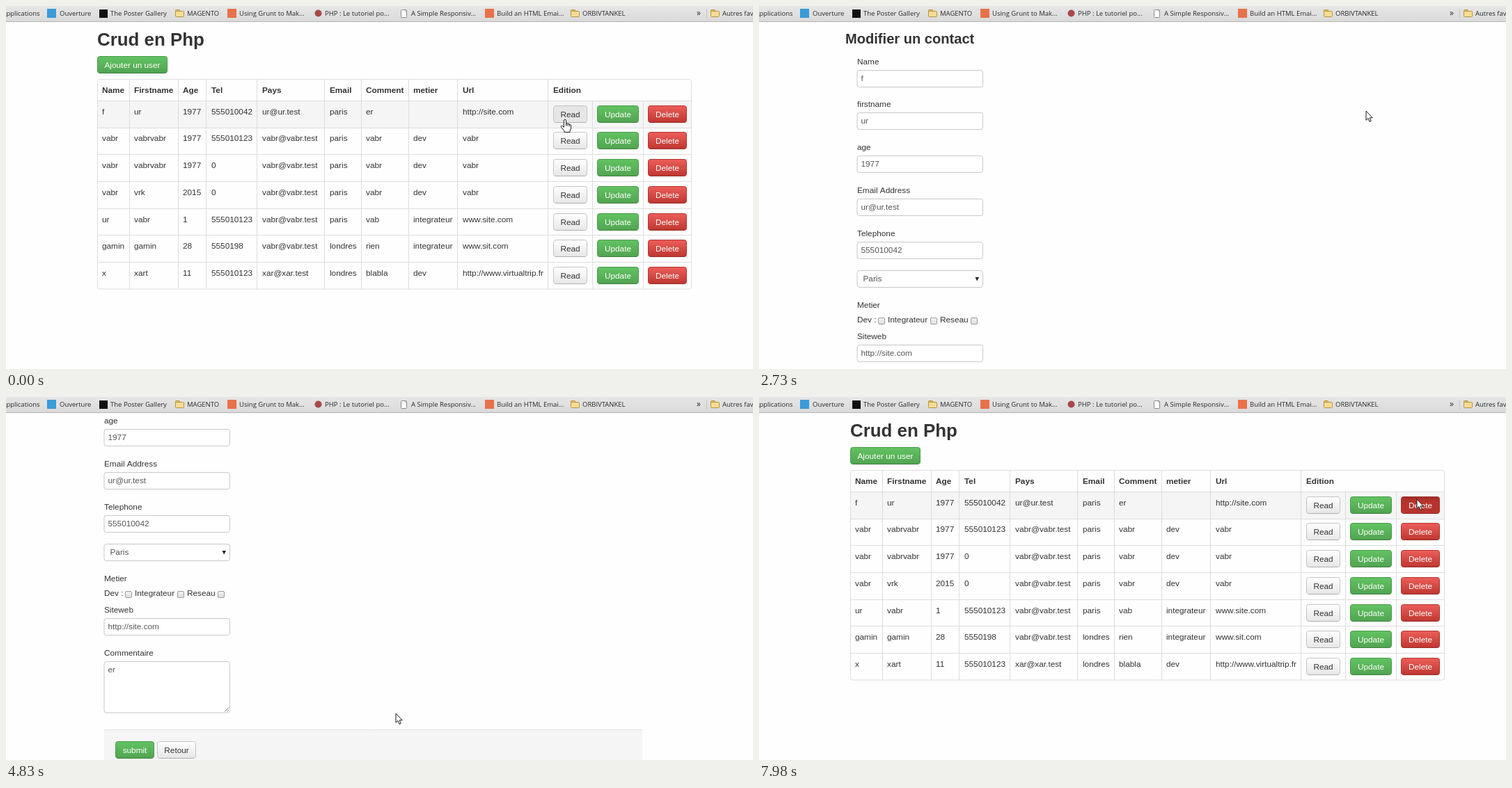
Write an HTML page with a canvas that moves like this. It is 1073x522 px and loops after 8 s.

```html
<!DOCTYPE html>
<html lang="fr">
<head>
<meta charset="utf-8">
<title>Crud en Php</title>
<style>
html, body { margin: 0; width: 100%; height: 100%; overflow: hidden; background: #fefefe; }
canvas { display: block; }
</style>
</head>
<body>
<canvas id="stage" width="1073" height="522"></canvas>
<script>
const ctx = document.getElementById('stage').getContext('2d');
const W = 1073, H = 522, LOOP = 8000, STEP = 70;
const SANS = '"Liberation Sans", Arial, sans-serif';
const BODY = `11.8px ${SANS}`, BOLD = `bold 11.8px ${SANS}`;
const TITLE = `bold 25.9px ${SANS}`, SUBTITLE = `bold 20.1px ${SANS}`;
const BAR = '9.5px "Open Sans", "Noto Sans", sans-serif';

const PHONE = '555010042', MAIL = 'ur@ur.test', MAIL2 = 'vabr@vabr.test';
const HEADS = ['Name', 'Firstname', 'Age', 'Tel', 'Pays', 'Email', 'Comment', 'metier', 'Url', 'Edition'];
const COLS = [138, 184, 254, 295, 368, 465, 517, 585, 656, 786];
const LINES = [177.5, 247.5, 287.5, 360.5, 457.5, 510.5, 578.5, 648.5, 778.5, 842.5, 915.5];
const ROWS = [
  ['f', 'ur', '1977', PHONE, MAIL, 'paris', 'er', '', 'http://site.com'],
  ['vabr', 'vabrvabr', '1977', '555010123', MAIL2, 'paris', 'vabr', 'dev', 'vabr'],
  ['vabr', 'vabrvabr', '1977', '0', MAIL2, 'paris', 'vabr', 'dev', 'vabr'],
  ['vabr', 'vrk', '2015', '0', MAIL2, 'paris', 'vabr', 'dev', 'vabr'],
  ['ur', 'vabr', '1', '555010123', MAIL2, 'paris', 'vab', 'integrateur', 'www.site.com'],
  ['gamin', 'gamin', '28', '5550198', MAIL2, 'londres', 'rien', 'integrateur', 'www.sit.com'],
  ['x', 'xart', '11', '555010123', 'xar@xar.test', 'londres', 'blabla', 'dev', 'http://www.virtualtrip.fr']
];
const rowTop = i => 136.5 + i * 38.68;

// Button skins: gradient top, bottom, border, text
const SKINS = {
  plain: ['#ffffff', '#e6e6e6', '#c4c4c4', '#333'],
  green: ['#62c462', '#51a351', '#4a9a4a', '#fff'],
  red: ['#ee5f5b', '#bd362f', '#b5352f', '#fff']
};

// Pointer path: time, x, y
const PATH = [
  [0, 803, 163], [490, 803, 163], [560, 640, 265], [630, 428, 375], [770, 428, 375],
  [840, 427, 388], [1260, 402, 428], [1470, 402, 428], [1890, 885, 110], [1960, 885, 110],
  [2100, 880, 125], [2170, 870, 150], [2310, 872, 151], [4690, 872, 151], [4760, 803, 427],
  [4830, 560, 455], [4900, 338, 478], [4970, 338, 478], [5530, 192, 506], [5600, 192, 506],
  [5740, 221, 503], [5950, 224, 504], [6160, 224, 504], [6510, 945, 500], [6580, 945, 500],
  [6860, 950, 388], [7000, 950, 388], [7490, 948, 188], [7560, 948, 188], [7770, 945, 147],
  [8000, 945, 147]
];
const PRESSES = [[70, 140], [1400, 1470], [2450, 2730], [6090, 6160], [7910, 8000]];
const SCENES = [[0, drawList], [140, drawDetail], [1470, drawList], [2730, drawForm], [6160, drawList]];

let now, hover, pressed, overButton, pointer;

function pointerAt(t) {
  const i = Math.max(1, PATH.findIndex(p => p[0] >= t));
  const [t0, x0, y0] = PATH[i - 1], [t1, x1, y1] = PATH[i];
  const k = (t - t0) / (t1 - t0);
  return { x: x0 + (x1 - x0) * k, y: y0 + (y1 - y0) * k };
}
const pointerShown = t => t < 2870 || t >= 4760;
const inside = (p, x, y, w, h) => p.x >= x && p.x <= x + w && p.y >= y && p.y <= y + h;

function scrollAt(t) {
  if (t < 3640) return 0;
  const u = Math.min(1, (t - 3640) / 560);
  return 46 + 123 * (1 - Math.pow(1 - u, 1.62));
}

function text(s, x, mid, font = BODY, color = '#333', align = 'left') {
  ctx.font = font;
  ctx.fillStyle = color;
  ctx.textAlign = align;
  ctx.fillText(s, x, mid + 4);
}

function rect(x, y, w, h, color) {
  ctx.fillStyle = color;
  ctx.fillRect(x, y, w, h);
}

function box(x, y, w, h, r, fill, stroke) {
  ctx.beginPath();
  ctx.roundRect(x, y, w, h, r);
  if (fill) { ctx.fillStyle = fill; ctx.fill(); }
  if (stroke) { ctx.strokeStyle = stroke; ctx.lineWidth = 1; ctx.stroke(); }
}

function line(x0, y0, x1, y1, color) {
  ctx.beginPath();
  ctx.moveTo(x0, y0);
  ctx.lineTo(x1, y1);
  ctx.strokeStyle = color;
  ctx.lineWidth = 1;
  ctx.stroke();
}

function shade(y0, y1, ...colors) {
  const g = ctx.createLinearGradient(0, y0, 0, y1);
  colors.forEach((c, i) => g.addColorStop(i / (colors.length - 1), c));
  return g;
}

function button(label, x, y, w, skin) {
  const [top, bottom, edge, ink] = SKINS[skin], h = 25;
  const hot = hover && inside(hover, x, y, w, h);
  if (pointerShown(now) && inside(pointer, x, y, w, h)) overButton = true;
  box(x + .5, y + .5, w - 1, h - 1, 3.3, hot ? bottom : shade(y, y + h, top, bottom), edge);
  if (hot && pressed) box(x + .5, y + .5, w - 1, h - 1, 3.3, shade(y, y + 6, 'rgba(0,0,0,.2)', 'rgba(0,0,0,.04)'));
  line(x + 3, y + h - .5, x + w - 3, y + h - .5, skin === 'plain' ? '#b0b0b0' : 'rgba(0,0,0,.16)');
  text(label, x + w / 2, y + 12.7, BODY, ink, 'center');
}

function drawList() {
  text('Crud en Php', 131, 52.5, TITLE);
  button('Ajouter un user', 131, 72, 101, 'green');
  ROWS.forEach((row, i) => {
    const y = rowTop(i);
    if (hover && inside(hover, 131, y, 854, 38.6)) rect(131.5, y, 853, 38.7, '#f5f5f5');
  });
  box(131.5, 105.5, 853, 301.5, 3.3, null, '#ddd');
  LINES.forEach((x, i) => line(x, i < 9 ? 106 : 136, x, 407, '#ddd'));
  HEADS.forEach((s, i) => text(s, COLS[i], 121.3, BOLD));
  ROWS.forEach((row, i) => {
    const y = rowTop(i), edge = Math.round(y - .5) + .5, top = Math.round(y + 6.3);
    line(131.5, edge, 984.5, edge, '#ddd');
    row.forEach((s, c) => text(s, COLS[c], y + 15.3));
    button('Read', 786, top, 49, 'plain');
    button('Update', 849, top, 60, 'green');
    button('Delete', 922, top, 56, 'red');
  });
}

function actionBar(x, y, w) {
  rect(x, y, w, 58, '#f5f5f5');
  line(x, y + .5, x + w, y + .5, '#e3e3e3');
}

function drawDetail() {
  text('Edition', 213, 50, SUBTITLE);
  const fields = [['Name', 'f'], ['Firstname', 'ur'], ['Email Address', MAIL], ['Phone', PHONE],
    ['Pays', 'paris'], ['Metier', ''], ['Url', 'http://site.com'], ['Comment', 'er']];
  fields.forEach(([label, value], i) => {
    const y = 85.2 + i * 41.15;
    text(label, 361, y, BODY, '#333', 'right');
    text(value, 394, y);
  });
  actionBar(229.5, 402, 642);
  button('Back', 378, 418, 46, 'plain');
}

function input(value, y, h = 24) {
  box(141, y + .5, 180.5, h, 3.3, '#fff', '#c8c8c8');
  text(value, 146.5, y + 12.3, BODY, '#555');
}

function drawForm() {
  const dy = Math.round(46 - scrollAt(now));
  text('Modifier un contact', 124, 4 + dy, SUBTITLE);
  const fields = [['Name', 'f'], ['firstname', 'ur'], ['age', '1977'], ['Email Address', MAIL], ['Telephone', PHONE]];
  fields.forEach(([label, value], i) => {
    const y = Math.floor(34.2 + i * 61.75) + dy;
    text(label, 141, y);
    input(value, y + 12);
  });

  const sel = 334 + dy;
  box(141, sel + .5, 180.5, 24, 3.3, '#fff', '#c8c8c8');
  text('Paris', 149.5, sel + 12.3, BODY, '#555');
  ctx.beginPath();
  ctx.moveTo(310.5, sel + 10);
  ctx.lineTo(316, sel + 10);
  ctx.lineTo(313.2, sel + 15.5);
  ctx.fillStyle = '#222';
  ctx.fill();

  text('Metier', 141, 384 + dy);
  [['Dev :', 141, 171], ['Integrateur', 185, 246], ['Reseau', 260, 304]].forEach(([s, x, bx]) => {
    text(s, x, 405 + dy);
    box(bx + .5, 402.5 + dy, 9, 9, 1.5, shade(402 + dy, 412 + dy, '#f4f4f4', '#dcdcdc'), '#9c9c9c');
  });
  text('Siteweb', 141, 429.3 + dy);
  input('http://site.com', 441 + dy);
  text('Commentaire', 141, 491 + dy);
  input('er', 503 + dy, 73.5);
  line(314, 575.5 + dy, 320, 569.5 + dy, '#777');
  line(317.5, 575.5 + dy, 320, 573 + dy, '#777');

  actionBar(141, 601 + dy, 773);
  button('submit', 157, 618 + dy, 56, 'green');
  button('Retour', 217, 618 + dy, 56, 'plain');
}

function folder(x) {
  box(x + .5, 5.5, 6, 5, 1, '#e8c468', '#b08a38');
  box(x + .5, 7.5, 12, 8, 1, '#f7dc94', '#b8923f');
}

function drawToolbar() {
  rect(0, 0, W, 22, shade(0, 22, '#e6e6e6', '#dadada'));
  rect(0, 22, W, 1, '#b4b4b4');
  const ink = '#2a2a2a', label = (s, x) => text(s, x, 10.2, BAR, ink);
  text('Applications', 48.5, 10.2, BAR, ink, 'right');
  rect(59, 4, 13, 13, '#3a9bd8');
  label('Ouverture', 77);
  rect(134, 5, 12, 12, '#111');
  label('The Poster Gallery', 150);
  folder(243);
  label('MAGENTO', 260);
  rect(318, 4, 13, 13, '#e8714a');
  label('Using Grunt to Mak...', 335);
  ctx.beginPath();
  ctx.arc(448.5, 10.5, 5, 0, 7);
  ctx.fillStyle = '#a8484a';
  ctx.fill();
  label('PHP : Le tutoriel po...', 458);
  box(567.5, 5.5, 8, 11, 1, '#fff', '#8a8a8a');
  line(573, 5.5, 575.5, 8.5, '#8a8a8a');
  label('A Simple Responsiv...', 582);
  rect(688, 4, 13, 13, '#e8714a');
  label('Build an HTML Emai...', 705);
  folder(811);
  label('ORBIVTANKEL', 828);
  text('»', 992, 10.2, '12px "Open Sans", sans-serif', ink);
  line(1006.5, 4, 1006.5, 18, '#c6c6c6');
  folder(1012);
  label('Autres favoris', 1029);
}

const ARROW = new Path2D('M0 0V13.2L3 10.5L5 15.4L7.2 14.5L5.2 9.8H9.2Z');
const HAND = new Path2D('M-1.6 1.2Q0 -.8 1.6 1.2V6L4 6.2L6.4 7L8.6 8.4V13L7 16.5V18.5H-1V16.8L-5.4 11.6Q-6.4 9.2 -4.4 8.8L-1.6 11.4Z');
const KNUCKLES = new Path2D('M1.6 6V9.5M4 6.4V9.6M6.4 7.2V10');

function drawPointer(hand) {
  ctx.save();
  ctx.translate(pointer.x, pointer.y);
  ctx.lineJoin = 'round';
  ctx.lineWidth = 1;
  ctx.fillStyle = '#fff';
  ctx.strokeStyle = '#1a1a1a';
  ctx.fill(hand ? HAND : ARROW);
  ctx.stroke(hand ? HAND : ARROW);
  if (hand) ctx.stroke(KNUCKLES);
  ctx.restore();
}

function draw(time) {
  now = Math.floor((time % LOOP) / STEP) * STEP;
  pointer = pointerAt(now);
  // Hover styling trails the pointer by one step
  hover = pointerShown(now) ? pointerAt(Math.max(0, now - STEP)) : null;
  pressed = PRESSES.some(([a, b]) => now >= a && now < b);
  overButton = false;
  rect(0, 0, W, H, '#fefefe');
  SCENES.filter(s => s[0] <= now).pop()[1]();
  drawToolbar();
  const late = now >= 7980 || (now >= 140 && now < 630);
  if (pointerShown(now)) drawPointer(overButton && !late);
}

const start = performance.now();
function tick() {
  draw(performance.now() - start);
  requestAnimationFrame(tick);
}
tick();
</script>
</body>
</html>
```
